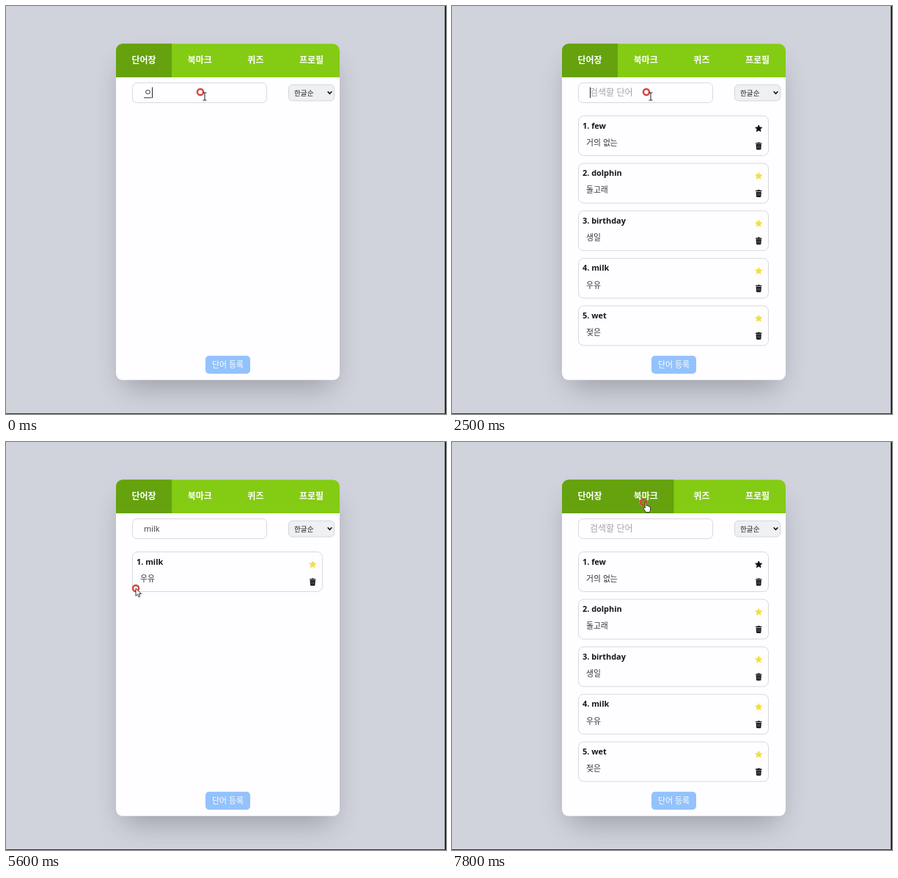
Write an HTML page that moves like this. It is 600x555 px and loops after 8 s.

```html
<!DOCTYPE html>
<html lang="ko">
<head>
<meta charset="utf-8">
<title>단어장</title>
<style>
  html, body { margin: 0; height: 100%; overflow: hidden; background: #d0d3dc; }
  svg { display: block; width: 100%; height: 100%; }
  text { font-family: "Noto Sans CJK KR", "Noto Sans KR", sans-serif; white-space: pre; }
  .tab { font-size: 12px; font-weight: 700; fill: #fff; text-anchor: middle; }
  .title { font: 700 10.9px "Open Sans", "Noto Sans", sans-serif; fill: #151517; }
  .meaning { font-size: 10.8px; fill: #333437; }
  .latin { font: 10.9px "Open Sans", "Noto Sans", sans-serif; }
  .hangul { font-size: 12px; }
  .box { fill: #fefdff; stroke: #d8d8e0; }
</style>
</head>
<body>
<svg viewBox="0 0 600 555" xmlns="http://www.w3.org/2000/svg">
  <defs>
    <filter id="blur" x="-40%" y="-40%" width="180%" height="180%"><feGaussianBlur stdDeviation="19"/></filter>
    <clipPath id="cardClip"><rect x="150" y="51.3" width="305" height="457.5" rx="9"/></clipPath>
    <path id="star" d="M0-4.6 1.3-1.6 4.5-1.3 2.1.9 2.8 4.1 0 2.4-2.8 4.1-2.1.9-4.5-1.3-1.3-1.6Z" stroke-width=".9" stroke-linejoin="round"/>
    <g id="trash">
      <path d="M-4.2-4.2H-1.7L-1.2-5H1.2L1.7-4.2H4.2V-2.9H-4.2Z" fill="#111"/>
      <path d="M-3.6-2.3H3.6L3.2 4Q3.1 5 2.1 5H-2.1Q-3.1 5-3.2 4Z" fill="#111"/>
      <path d="M-1.6-.8V3.4M0-.8V3.4M1.6-.8V3.4" stroke="#8b8b8f" stroke-width=".6"/>
    </g>
  </defs>

  <rect width="600" height="555" fill="#d0d3dc"/>
  <rect x="159" y="79.5" width="287" height="439" rx="9" opacity=".25" filter="url(#blur)"/>
  <g clip-path="url(#cardClip)">
    <rect x="150" y="51" width="305" height="458" fill="#fefdff"/>
    <rect x="150" y="51" width="305" height="46" fill="#84cb14"/>
    <rect id="activeTabs" x="150" y="51" width="76" height="46" fill="#65a20e"/>
  </g>
  <g id="tabs"></g>

  <rect class="box" x="172.5" y="104.5" width="183" height="27" rx="6"/>
  <text id="query" x="188" y="122.3"></text>
  <path id="underline" stroke="#333" fill="none"/>
  <path id="caret" stroke="#222" fill="none"/>

  <rect x="385.5" y="107.2" width="62" height="21.8" rx="5" fill="#eff0f3" stroke="#d3d5db"/>
  <text x="393" y="121.5" font-size="9.6" fill="#222">한글순</text>
  <path d="M438.6 116.3 441.5 119.3 444.4 116.3" fill="none" stroke="#111" stroke-width="1.6"/>

  <g id="list"></g>

  <rect x="272" y="475.8" width="61" height="24.4" rx="5" fill="#93c2fc"/>
  <text x="302.5" y="491.9" font-size="10.9" fill="#fff" text-anchor="middle">단어 등록</text>

  <g id="pointer">
    <g id="redRing" fill="none">
      <circle r="5.2" stroke="#e9b5b5" stroke-opacity=".6" stroke-width="1.2"/>
      <circle r="4" stroke="#d9423f" stroke-width="2.3"/>
    </g>
    <g id="blueRing" fill="none">
      <circle r="7.2" stroke="#bfeafa" stroke-width="2.2"/>
      <circle r="5.3" stroke="#69cdf1" stroke-width="3.2"/>
    </g>
    <path id="beam" d="M3.6.8H5.2Q6 .8 6 1.6Q6 .8 6.8.8H8.4M6 1.4V10.6M3.6 11.2H5.2Q6 11.2 6 10.4Q6 11.2 6.8 11.2H8.4" fill="none" stroke="#222" stroke-width="1"/>
    <path id="arrow" d="M0 0V10.4L2.4 8.2 4 11.9 5.8 11.1 4.2 7.5H7.5Z" fill="#fff" stroke="#222" stroke-width=".9" stroke-linejoin="round"/>
    <path id="hand" d="M2.2.6Q3.3-.6 4.2.8V4.8Q5.6 4 6 5.2Q7.2 4.6 7.8 5.8Q9.4 5.4 9.6 7V10.2Q9.4 12 8.5 13.6H3.4Q2.4 11.6.2 8.8Q-.5 7.4.6 7Q1.5 7 2.2 8Z" fill="#fff" stroke="#222" stroke-width=".9" stroke-linejoin="round"/>
  </g>

  <rect x="598.4" width="1.6" height="555" fill="#111214"/>
  <rect y="554" width="600" height="1" fill="#35373c"/>
</svg>
<script>
const LOOP = 8000, STEP = 100, BLINK = 500;
const $ = id => document.getElementById(id);

const words = [
  { en: 'few', ko: '거의 없는', marked: false },
  { en: 'dolphin', ko: '돌고래', marked: true },
  { en: 'birthday', ko: '생일', marked: true },
  { en: 'milk', ko: '우유', marked: true },
  { en: 'wet', ko: '젖은', marked: true }
];

// [time, field content, last syllable still being composed]; each entry restarts the caret blink
const typing = [
  [0, 'ㅇ', true], [100, ''], [300, ''],
  [800, 'ㄷ', true], [1000, '도', true], [1100, '돌', true], [1200, '돍', true],
  [1300, '돌고', true], [1400, '돌골', true], [1500, '돌고래', true],
  [2100, '돌고ㄹ', true], [2200, '돌고'], [2300, '돌'], [2400, ''], [3500, ''],
  [4300, 'm'], [4600, 'mi'], [4800, 'mil'], [5000, 'milk'], [6500, 'milk'],
  [7000, 'mil'], [7100, 'mi'], [7200, 'm'], [7300, '']
];

// [time, x, y]
const path = [
  [0, 265, 117], [5300, 265, 117], [5400, 248, 132], [5500, 203, 174],
  [5600, 177, 199], [5900, 179, 196], [6100, 244, 133], [6200, 264, 119],
  [6300, 265, 118], [7400, 265, 118], [7500, 264, 109], [7600, 262, 91],
  [7700, 261, 84], [7800, 261, 82], [LOOP, 261, 82]
];
const click = { from: 6600, to: 6900 };

$('tabs').innerHTML = ['단어장', '북마크', '퀴즈', '프로필']
  .map((name, i) => `<text class="tab" x="${188 + i * 76.2}" y="78.3">${name}</text>`).join('');

function row(word, i) {
  const color = word.marked ? '#f1df42' : '#111';
  return `<g transform="translate(0 ${i * 64.6})">
    <rect class="box" x="172.5" y="149.5" width="259" height="54" rx="7"/>
    <text class="title" x="178" y="166.6">${i + 1}. ${word.en}</text>
    <text class="meaning" x="183" y="189.8">${word.ko}</text>
    <use href="#star" x="418.2" y="166.6" fill="${color}" stroke="${color}"/>
    <use href="#trash" x="418.2" y="190.4"/>
  </g>`;
}

let shown = null;
function drawList(query) {
  if (query === shown) return;
  shown = query;
  $('list').innerHTML = words
    .filter(w => w.en.includes(query) || w.ko.includes(query)).map(row).join('');
}

function drawField(t) {
  const [start, text, composing] = typing.filter(k => k[0] <= t).pop();
  const el = $('query');
  el.textContent = text || '검색할 단어';
  el.setAttribute('class', /[a-z]/.test(text) ? 'latin' : 'hangul');
  el.setAttribute('fill', text ? '#333438' : '#a3a5ad');
  const end = 188 + (text ? el.getComputedTextLength() : 0);
  const from = composing ? end - el.getSubStringLength(text.length - 1, 1) : 0;
  $('underline').setAttribute('d', composing ? `M${from} 124.8H${end - .6}` : '');
  const on = (t - start) % (2 * BLINK) < BLINK;
  $('caret').setAttribute('d', on ? `M${Math.floor(end) + .5} 110.5V125` : '');
  drawList(text);
}

function mouseAt(t) {
  const i = path.findIndex(k => k[0] > t);
  const [t0, x0, y0] = path[i - 1], [t1, x1, y1] = path[i];
  const p = (t - t0) / (t1 - t0);
  return [x0 + (x1 - x0) * p, y0 + (y1 - y0) * p];
}

function show(id, on) {
  $(id).setAttribute('visibility', on ? 'visible' : 'hidden');
}

function drawPointer(t) {
  const [x, y] = mouseAt(t);
  const onTab = y < 97;
  const onField = !onTab && x > 172 && x < 356 && y > 104 && y < 132;
  const pressed = t >= click.from && t < click.to;
  $('pointer').setAttribute('transform', `translate(${x} ${y})`);
  show('beam', onField);
  show('hand', onTab);
  show('arrow', !onTab && !onField);
  show('blueRing', pressed);
  show('redRing', !pressed);
  $('activeTabs').setAttribute('width', onTab ? 152.5 : 76);
}

function draw(now) {
  const t = Math.floor(now % LOOP / STEP) * STEP;
  drawField(t);
  drawPointer(t);
}

let begin;
function tick(now) {
  begin ??= now;
  draw(Math.max(0, now - begin));
  requestAnimationFrame(tick);
}
draw(0);
requestAnimationFrame(tick);
</script>
</body>
</html>
```
